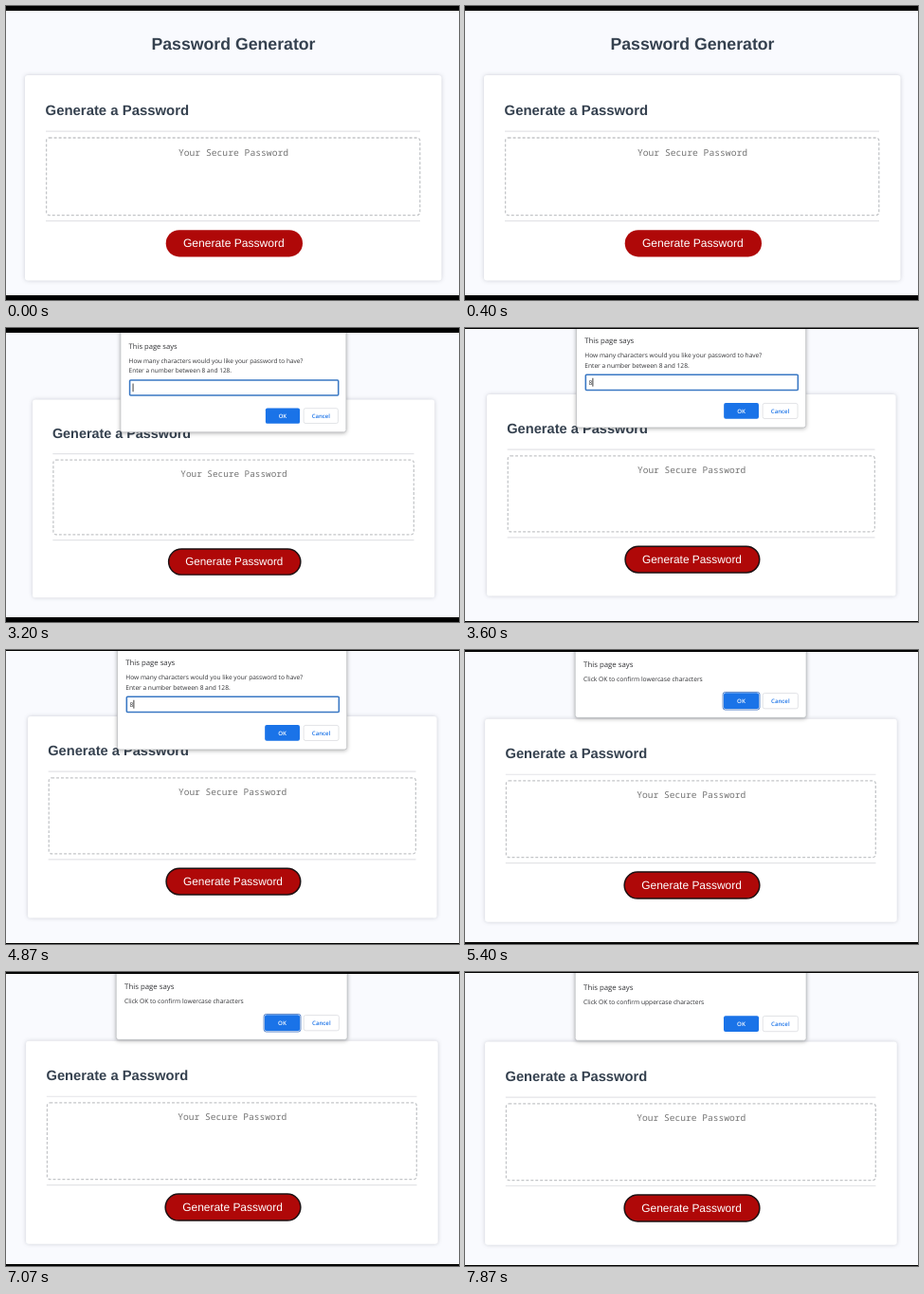
These frames come from a looping animation (478 by 310 pixels, 8 s). An HTML page:

```html
<!DOCTYPE html>
<html lang="en">
<head>
<meta charset="utf-8">
<title>Password Generator</title>
<style>
  html, body { margin: 0; width: 100%; height: 100%; overflow: hidden; background: #f9fafe; }
  svg { display: block; width: 478px; height: 310px; }
  text { text-rendering: geometricPrecision; font-family: "Liberation Sans", Arial, sans-serif; }
  .heading { font-weight: bold; fill: #35414f; }
  .middle { text-anchor: middle; }
  .card { fill: #fff; filter: drop-shadow(0 0 2px rgba(40, 45, 65, .22)); }
  .rule { stroke: #e3e4e7; stroke-width: 1.2; }
  .output { fill: none; stroke: #c3c5c8; stroke-width: 1.3; stroke-dasharray: 3 2; }
  .placeholder { font: 9.7px "Noto Sans Mono", monospace; fill: #757575; }
  .panel { fill: #fff; stroke: #b9bbbe; stroke-width: .7; filter: drop-shadow(0 1px 2px rgba(0, 0, 0, .3)); }
  #dialog text { font: 6.73px "Open Sans", sans-serif; fill: #303134; }
  #dialog .says { font-size: 7.88px; }
  #dialog .label { font-size: 6.2px; font-weight: 600; }
  .input { fill: #fff; stroke: #3a78c4; stroke-width: 1.6; }
</style>
</head>
<body>
<svg viewBox="0 0 478 310">
  <rect width="478" height="310" fill="#f9fafe"/>
  <g id="page">
    <text class="heading middle" x="240" y="46" font-size="17.7">Password Generator</text>
    <rect class="card" x="20" y="73" width="439.5" height="216.5" rx="3"/>
    <text class="heading" x="41.6" y="114.9" font-size="14.9">Generate a Password</text>
    <path class="rule" d="M42 132.2H437M42 226.6H437"/>
    <rect class="output" x="42.6" y="139" width="394.2" height="81.6" rx="3"/>
    <text class="placeholder middle" x="240" y="157.6">Your Secure Password</text>
    <rect id="button" x="168.7" y="236.2" width="144.3" height="28.2" rx="14.1" fill="#af0808"/>
    <text class="middle" x="240.4" y="254" font-size="12.1" fill="#fff">Generate Password</text>
    <g id="dialog">
      <rect id="panel" class="panel" x="116.2" y="-20" width="246.6" rx="2.5"/>
      <text class="says" x="125.2" y="17.6">This page says</text>
      <text id="message" x="125.2" y="33.1"></text>
      <g id="prompt">
        <text x="125.2" y="44">Enter a number between 8 and 128.</text>
        <rect class="input" x="126.2" y="51.8" width="228.1" height="16.6" rx="1"/>
        <text id="value" x="129.4" y="62.7"></text>
        <path id="caret" d="M0 55.5v9" stroke="#222" stroke-width=".9"/>
      </g>
      <g id="actions">
        <rect id="ring" x="273.8" y="-.9" width="39.3" height="18.8" rx="2.5" fill="#fff" stroke="#2a62b8" stroke-width=".8"/>
        <rect x="274.7" width="37.5" height="17" rx="2" fill="#1a73e8"/>
        <text class="label middle" x="293.4" y="10.7" style="fill:#fff">OK</text>
        <rect x="316.4" y=".3" width="37.6" height="16.4" rx="2" fill="#fff" stroke="#dadce0" stroke-width=".8"/>
        <text class="label middle" x="335.2" y="10.7" style="fill:#1a73e8">Cancel</text>
      </g>
    </g>
  </g>
  <rect id="topBar" width="478"/>
  <rect id="bottomBar" width="478" height="10"/>
</svg>
<script>
const LOOP = 8000;
const question = "How many characters would you like your password to have?";
const confirmText = kind => `Click OK to confirm ${kind} characters`;

// view: scale, x, y of the recorded page; bars: bottom of the top bar, top of the bottom bar
const scenes = [
  { start: 0, view: [1, 0, 0], bars: [5, 305] },
  { start: 1800, view: [.965, 8.8, 5], bars: [5, 305], message: question, value: "" },
  { start: 3600, view: [.982, 3.4, -1.7], bars: [1, 309], message: question, value: "8" },
  { start: 5400, view: [.989, 1.3, .5], bars: [2, 308], message: confirmText("lowercase"), ring: true },
  { start: 7200, view: [.989, 1.3, 1.4], bars: [1, 309], message: confirmText("uppercase") }
];

const el = id => document.getElementById(id);
const set = (id, attributes) => {
  for (const name in attributes) el(id).setAttribute(name, attributes[name]);
};
const show = (id, visible) => set(id, { display: visible ? "inline" : "none" });

function render({ view: [scale, x, y], bars, message, value, ring }) {
  const asksNumber = value !== undefined;
  const bottom = asksNumber ? 108.6 : 71.6;
  set("page", { transform: `translate(${x} ${y}) scale(${scale})` });
  set("topBar", { height: bars[0] });
  set("bottomBar", { y: bars[1] });
  set("button", { stroke: message ? "#1c1012" : "none", "stroke-width": 1.5 });
  show("dialog", message);
  set("panel", { height: bottom + 20 });
  set("actions", { transform: `translate(0 ${bottom - 26.3})` });
  el("message").textContent = message || "";
  show("prompt", asksNumber);
  el("value").textContent = value || "";
  set("caret", { transform: `translate(${value ? 133.9 : 129.8} 0)` });
  show("ring", ring);
}

let current;
function tick() {
  const time = performance.now() % LOOP;
  const scene = scenes.findLast(s => s.start <= time);
  if (scene !== current) render(current = scene);
  requestAnimationFrame(tick);
}
tick();
</script>
</body>
</html>
```
